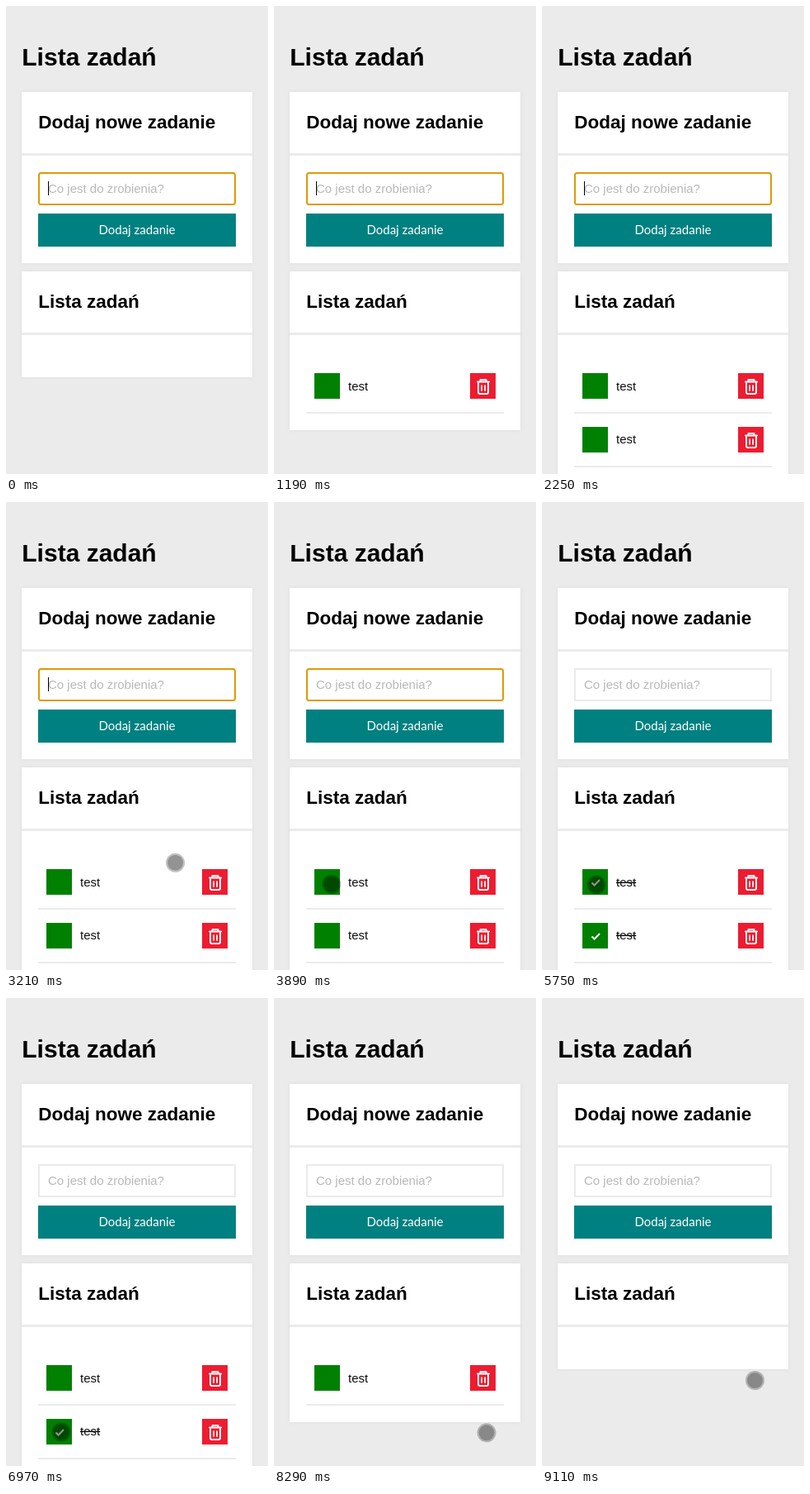
An HTML page that plays this animation: 318 by 566 pixels, repeating every 9.18 s.

```html
<!DOCTYPE html>
<html lang="pl">
<head>
<meta charset="utf-8">
<title>Lista zadań</title>
<style>
  html, body { margin: 0; width: 100%; height: 100%; overflow: hidden; background: #ebebeb; }
  svg { display: block; font: 15px "Liberation Sans", Arial, sans-serif; }
  .title { font-size: 30px; font-weight: bold; }
  .heading { font-size: 22.5px; font-weight: bold; }
  .card { fill: #fff; filter: drop-shadow(0 0 2px #ddd); }
  .line { fill: #ebebeb; }
  .button { font-family: Lato, sans-serif; fill: #fff; text-anchor: middle; }
  .icon { fill: none; stroke: #fff; stroke-width: 2; }
  .done text { text-decoration: line-through; }
  .task:not(.done) .check { display: none; }
</style>
</head>
<body>
<svg width="318" height="566" viewBox="0 0 318 566">
  <text class="title" x="19.3" y="72">Lista zadań</text>
  <rect class="card" x="19" y="104" width="280" height="207"/>
  <rect class="line" x="19" y="178" width="280" height="3"/>
  <text class="heading" x="39.3" y="148">Dodaj nowe zadanie</text>
  <rect id="field" x="40" y="202" width="238" height="38" fill="#fff" stroke-width="2"/>
  <text id="input" x="51" y="226"></text>
  <rect id="caret" y="212" width="1" height="17"/>
  <rect x="39" y="251" width="240" height="40" fill="#008080"/>
  <text class="button" x="159" y="276">Dodaj zadanie</text>
  <rect id="list" class="card" x="19" y="321" width="280"/>
  <rect class="line" x="19" y="395" width="280" height="3"/>
  <text class="heading" x="39.3" y="365">Lista zadań</text>
  <g id="tasks"></g>
  <g id="pointer" fill="rgba(0,0,0,.24)">
    <circle r="11.5"/>
    <circle r="9.5"/>
  </g>
</svg>
<script>
const LOOP = 9180, BLUR = 4100;
const WORD = 'test';
const $ = id => document.getElementById(id);

// Keys come in pairs, with a longer pause after each pair; Enter is the last one
const keyDelay = i => 130 * i + 70 * Math.floor(i / 2);
const ENTER = keyDelay(WORD.length);

const TASKS = [
  { start: 530, done: 4180, undone: 6100, removed: 8970 },
  { start: 1590, done: 5210, undone: LOOP, removed: 8160 }
];

const FIRST = [66, 463], SECOND = [67, 525], REMOVE = [258, 526], REMOVE_FIRST = [258.5, 462.5];
const ENTRY = { time: 2930, at: [291, 420] };
const MOVES = [
  { from: ENTRY.time, to: 3960, at: FIRST },
  { from: 4250, to: 4750, at: SECOND },
  { from: 5280, to: 5750, at: FIRST },
  { from: 6170, to: 6970, at: SECOND },
  { from: 7230, to: 8030, at: REMOVE },
  { from: 8290, to: 8710, at: REMOVE_FIRST }
];

$('tasks').innerHTML = TASKS.map((_, i) => `
  <g class="task">
    <g transform="translate(0 ${65 * i})">
      <rect x="49" y="444" width="31" height="31" fill="green"/>
      <path class="icon check" d="M60.5 460.5l3 3 6.5-6.5"/>
      <rect x="238" y="444" width="31" height="31" fill="#ed1c30"/>
      <g class="icon" stroke-linejoin="round" stroke-linecap="round">
        <path d="M247 454.5h14M250.5 454v-2h7v2M248 455v12q0 2 2 2h8q2 0 2-2v-12"/>
        <path d="M252 459v6M256 459v6" stroke-width="1.7"/>
      </g>
      <rect class="line" x="39" y="491" width="240" height="2"/>
    </g>
    <text x="90" y="${465 + 64 * i}" fill="#111">${WORD}</text>
  </g>`).join('');
const rows = [...$('tasks').children];

// Text in the field, and the time of the last key press
function typing(t) {
  let text = '', lastKey = -210;
  for (const { start } of TASKS) {
    for (let i = 0; i <= WORD.length; i++) {
      if (t < start + keyDelay(i)) break;
      text = i < WORD.length ? WORD.slice(0, i + 1) : '';
      lastKey = start + keyDelay(i);
    }
  }
  return { text, lastKey };
}

function caretOn(age) {
  return age < 340 || (age - 340) % 1000 >= 500;
}

function pointerAt(t) {
  return MOVES.reduce((pos, { from, to, at }) => {
    const u = Math.min(1, Math.max(0, (t - from) / (to - from)));
    const k = 1 - (1 - u) ** 1.5;
    return pos.map((v, i) => v + (at[i] - v) * k);
  }, ENTRY.at);
}

function show(el, visible) {
  el.style.display = visible ? '' : 'none';
}

function draw(t) {
  const focused = t < BLUR, input = $('input');
  const { text, lastKey } = typing(t);
  $('field').setAttribute('stroke', focused ? '#de9a08' : '#ebebeb');
  $('field').setAttribute('rx', focused ? 2.5 : 0);
  input.textContent = text || 'Co jest do zrobienia?';
  input.setAttribute('fill', text ? '#000' : '#b8b8b8');
  $('caret').setAttribute('x', 51 + (text ? Math.round(input.getComputedTextLength()) : 0));
  show($('caret'), focused && caretOn(t - lastKey));

  let count = 0;
  TASKS.forEach(({ start, done, undone, removed }, i) => {
    const visible = t >= start + ENTER && t < removed;
    count += visible;
    show(rows[i], visible);
    rows[i].classList.toggle('done', t >= done && t < undone);
  });
  $('list').setAttribute('height', 128 + 64 * count);

  show($('pointer'), t >= ENTRY.time);
  $('pointer').setAttribute('transform', `translate(${pointerAt(t)})`);
}

const origin = performance.now();
function frame() {
  draw((performance.now() - origin) % LOOP);
  requestAnimationFrame(frame);
}
frame();
</script>
</body>
</html>
```
